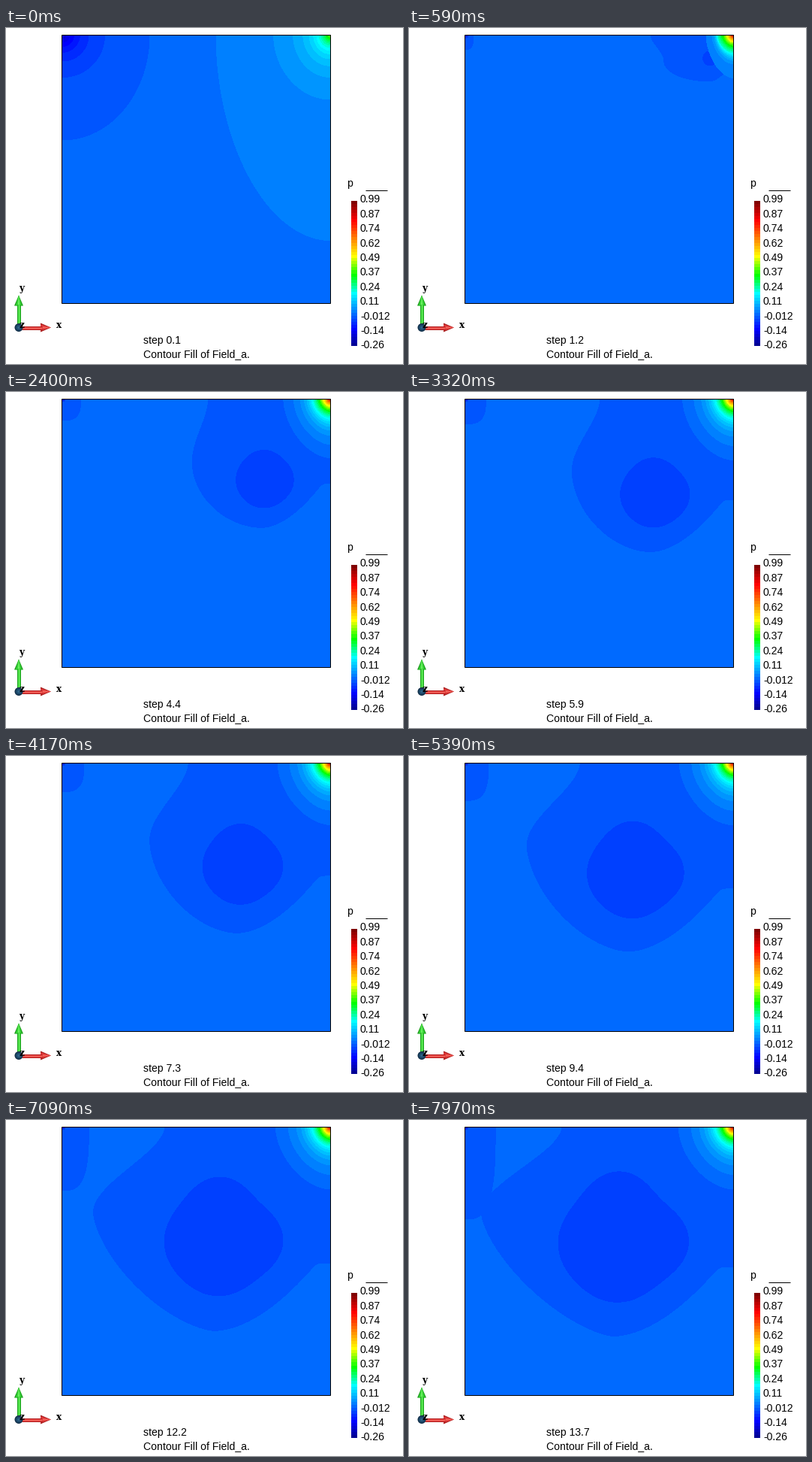
Animation, 529 px wide and 447 px high, one loop 8000 ms. Source, as a matplotlib script:

```python
import numpy as np
import matplotlib.pyplot as plt
from matplotlib.animation import FuncAnimation
from matplotlib.patches import Circle, Polygon, Rectangle

W, H, DPI = 529, 447, 64
PX = 72 / DPI                      # points per pixel
LOOP, INTERVAL = 8000, 40
L, T, R, B = 75, 9, 432, 366       # inside of the plot box
LEVELS, BASE = 48, 10              # colour bands, band of the calm fluid
LOW, HIGH = -0.2637, 0.994         # legend range

plt.rcParams["font.family"] = "Liberation Sans"
fig = plt.figure(figsize=(W / DPI, H / DPI), dpi=DPI, facecolor="white")
ax = fig.add_axes([0, 0, 1, 1])
ax.set(xlim=(0, W), ylim=(H, 0))
ax.axis("off")


def band_color(k):
    """Dark blue, blue, cyan, pure green, yellow, red, dark red."""
    x = (k + 1) / LEVELS
    red = min(8 * x - 4, 4.5 - 4 * x)
    green = min(4 * x - 0.5, 3.5 - 4 * x)
    blue = min(4 * x + 0.5, 4 - 8 * x)
    return tuple(np.clip([red, green, blue], 0, 1))


# ---- plot area --------------------------------------------------------------
box = Rectangle((L, T), R - L, B - T, fc=band_color(BASE), lw=0)
ax.add_patch(box)


def region(k):
    p = Polygon([(0, 0), (0, 1), (1, 1)], fc=band_color(k), lw=0, antialiased=False)
    ax.add_patch(p)
    p.set_clip_path(box)
    return p


halo = region(BASE - 1)
lobe = region(BASE - 1)
trough = region(BASE - 1)
core = region(BASE - 2)
sinks = [region(BASE - n) for n in range(2, 8)]
rim = region(BASE)
peaks = [region(BASE + n) for n in range(1, LEVELS - BASE)]

ax.add_patch(Rectangle((L - 1, T), R - L + 1, B - T, fill=False, ec="black", lw=PX))


# ---- contour shapes as functions of the step value s ------------------------
UNIT = np.linspace(0, 1, 40)
QUARTER = UNIT * np.pi / 2
TURN = np.linspace(0, 2 * np.pi, 120)


def settle(s, limit, tau, power=1):
    return limit * (1 - np.exp(-(s / tau) ** power))


def arc(a, b, power=2.0):
    """Quarter superellipse from (a, 0) to (0, b)."""
    c, d = np.clip(np.cos(QUARTER), 0, 1), np.sin(QUARTER)
    return a * c ** (2 / power), b * d ** (2 / power)


def corner(cx, side, a, b, power=2.0):
    """Sector hanging from the top edge at x = cx."""
    x, y = arc(a, b, power)
    return np.vstack([np.column_stack([cx + side * x, T + y]), [(cx, T)]])


def trough_shape(s):
    top_x = R - 104 * s ** 0.3
    tip_x, tip_y = R - 83.8 * s ** 0.53, T + settle(s, 118, 3.5)
    low_x, low_y = R - settle(s, 180, 6.2), T + settle(s, 300, 5.2)
    wall_y = T + settle(s, 202, 5.4)

    v = UNIT ** 0.95
    left = top_x + (tip_x - top_x) * v * v * (3 - 2 * v), T + (tip_y - T) * UNIT
    dx, dy = arc(low_x - tip_x, low_y - tip_y, 2.1 - 0.048 * s)
    bowl = low_x - dx, tip_y + dy
    z = 1 - (UNIT / 0.88) ** 1.8
    z = (z + np.sqrt(z * z + 0.002)) / 2
    right = low_x + (R - low_x) * UNIT, wall_y + (low_y - wall_y) * z
    parts = [np.column_stack(p) for p in (left, bowl, right)]
    return np.vstack(parts + [[(R, T)]])


def core_shape(s):
    q = 0.0037 * s                 # the circle grows squarer and lopsided
    size = (15.4 + 5.2 * s) / (1 + q) * settle(s, 1, 1.6, 2)
    tilt = np.cos(TURN - np.radians(135)) + np.cos(3 * (TURN - np.radians(15)))
    r = size * (1 + 0.9 * q * np.cos(4 * TURN) + q * tilt)
    cx, cy = R - settle(s, 160, 5.6), T + settle(s, 147, 3.61, 1.3)
    return np.column_stack([cx + r * np.cos(TURN), cy + r * np.sin(TURN)])


def start_up(s):
    """Share left of the pressure burst at the impulsive start."""
    end = (0.1 / 3) ** 0.8
    return max(0.0, ((0.1 / s) ** 0.8 - end) / (1 - end))


def draw_field(s):
    w = start_up(s)
    trough.set_xy(trough_shape(s))
    core.set_xy(core_shape(s))

    late = (s / 11) ** 6
    lobe.set_xy(corner(L, 1, settle(s, 31, 2.8) + 2.5 * late,
                       16 + 2.9 * s + 18 * late, 3))
    halo.set_xy(corner(L, 1, 116 * w, 140 * w))
    for n, p in enumerate(sinks, 2):
        r = max((117 / n - 2 * (n - 1)) * w, 6 - n, 0)
        p.set_xy(corner(L, 1, r, r))

    ra, rb = settle(s, 73, 2.3), settle(s, 83, 1.5)
    rim.set_xy(corner(R, -1, ra, rb, 1.75))
    for n, p in enumerate(peaks, 1):
        fade = max(0, 1 - n / 9)
        a1 = max(0, 56 - 16 * np.log(n)) * (1 + (ra / 73 - 1) * fade)
        b1 = a1 * (1.1 + (rb / ra - 1.1) * fade)
        a0 = max(0, 152 / n - 0.6 * (n - 1))
        b0 = a0 * (1.8 if n == 1 else 1.14)
        p.set_xy(corner(R, -1, a1 + (a0 - a1) * w, b1 + (b0 - b1) * w,
                        1.75 + 0.2 * w))


# ---- labels, legend, axes triad ---------------------------------------------
def label(x, y, s, size=14, **kw):
    return ax.text(x, y, s, fontsize=size * PX, color="black", va="baseline", **kw)


def line(x, y, color="black", width=1):
    ax.plot(x, y, color=color, lw=width * PX, solid_capstyle="butt")


step_text = label(183, 420, "")
label(183, 438.5, "Contour Fill of Field_a.")
label(454, 211, "p")
line([479, 508], [216, 216])

band = 193 / LEVELS
for k in range(LEVELS):
    ax.add_patch(Rectangle((460, 423 - (k + 1) * band), 8, band, fc=band_color(k),
                           lw=0, antialiased=False))
for i, value in enumerate(np.linspace(HIGH, LOW, 11)):
    label(472, 232.4 + 19.4 * i, f"{value:.2g}")


def arrow(dx, dy, dark, mid, light):
    at = lambda u, v: (17 + u * dx + v * dy, 398.5 + u * dy + v * dx)
    for color, width in ((dark, 5), (mid, 3.4), (light, 1.2)):
        line(*zip(at(4, 0), at(31, 0)), color, width)
    for color, half in ((dark, 6), (mid, 4.2), (light, 1.4)):
        ax.add_patch(Polygon([at(29, -half), at(29, half), at(43, 0)], fc=color, lw=0))


arrow(0, -1, "#1f9a1f", "#35d435", "#6cf060")
arrow(1, 0, "#a82020", "#e03838", "#f46a60")
for r, c in ((5.5, "#12304a"), (4, "#1d4a6c"), (1.8, "#2f6488")):
    ax.add_patch(Circle((17, 398.5), r, fc=c, lw=0, zorder=3))
for x, y, s in ((21, 350, "y"), (70.5, 399, "x"), (20.5, 399, "z")):
    label(x, y, s, 12, family="DejaVu Serif", weight="bold", ha="center", zorder=4)


# ---- animation --------------------------------------------------------------
CLOCK = [0, 1530, 3320, 6320, 7970]
COUNT = [1, 30, 59, 110, 137]


def update(i):
    s = int(np.interp(i * INTERVAL + 30, CLOCK, COUNT) + 1e-6) / 10
    draw_field(s)
    step_text.set_text(f"step {s:g}")
    return []


anim = FuncAnimation(fig, update, frames=LOOP // INTERVAL, interval=INTERVAL,
                     init_func=lambda: update(0), repeat=True, repeat_delay=0,
                     blit=False)
plt.show()
```
